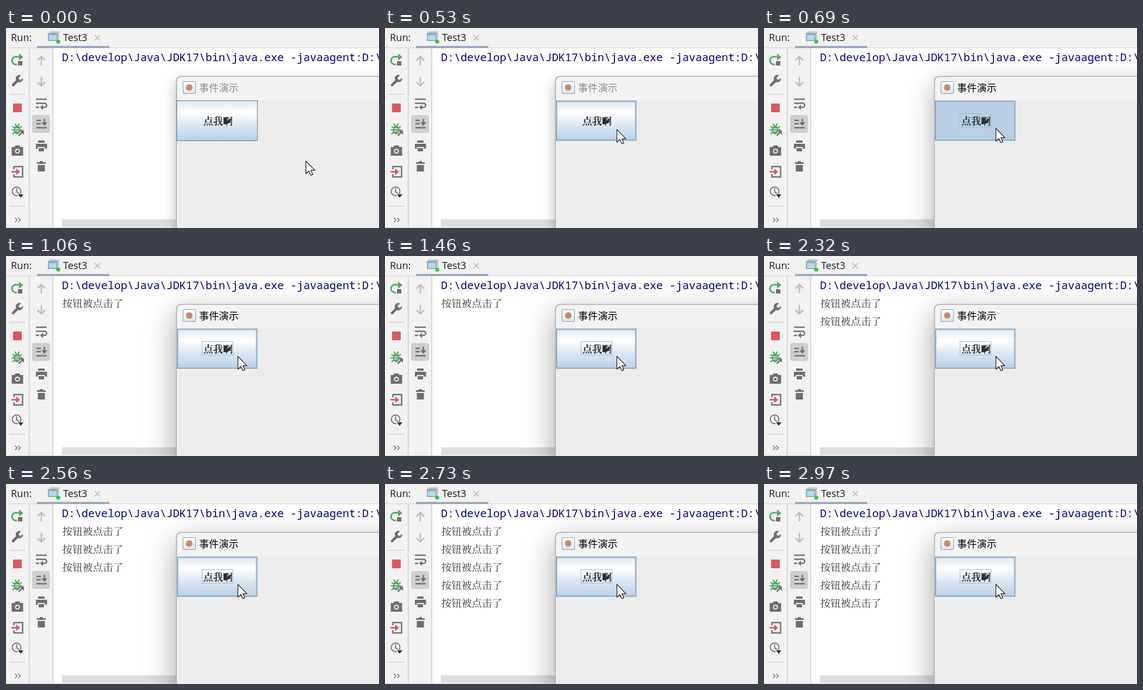
An HTML page for the animation above (3010 ms loop, 686 by 368 pixels).

```html
<!DOCTYPE html>
<html lang="zh">
<head>
<meta charset="utf-8">
<title>Run</title>
<style>
  html, body { margin: 0; width: 100%; height: 100%; overflow: hidden; background: #fff; }
  #stage { position: relative; width: 100%; height: 100%; overflow: hidden; contain: paint; }
  svg { display: block; width: 686px; height: 368px; position: absolute; left: 0; top: 0; }
  .ui { font: 18.2px "Open Sans", "Noto Sans", sans-serif; fill: #1a1a1a; }
  .code { font: 20px "Noto Sans Mono", monospace; fill: #000080; white-space: pre; }
  .row { font: 300 18.7px "Noto Serif CJK SC", "Noto Sans CJK SC", "Noto Sans CJK", serif; fill: #333; visibility: hidden; }
  .title { font: 18.2px "Noto Sans CJK SC", "Noto Sans CJK", sans-serif; }
  .label { font: bold 18px "Noto Serif CJK SC", "Noto Sans CJK SC", "Noto Sans CJK", serif; fill: #333; }
  #shadow, #shadowOn {
    position: absolute; left: 313px; top: 88px; right: 0; bottom: 0;
    border-radius: 10px 0 0 0;
  }
  /* the window runs on past the stage, so its shadow does too */
  #shadow::before, #shadowOn::before {
    content: ""; position: absolute; left: 0; top: 0; width: 480px; height: 420px;
    border-radius: inherit;
  }
  #shadow::before { box-shadow: 0 9px 26px rgba(0, 0, 0, .27); }
  #shadowOn::before { box-shadow: 0 18px 56px rgba(0, 0, 0, .36); }
  #shadowOn { opacity: 0; }
  .line { fill: none; stroke: #6e6e6e; stroke-width: 2.4; }
  .thin { fill: none; stroke: #6e6e6e; stroke-width: 1.8; }
  .gray { fill: #6e6e6e; }
  .pale { fill: none; stroke: #bdbdbd; stroke-width: 2.6; }
  .ring { fill: none; stroke: #b8cfe5; stroke-width: 1.25; }
  .dark { stroke: #7a8a99; }
</style>
</head>
<body>
<div id="stage">
<svg viewBox="0 0 686 368">
  <rect width="686" height="368" fill="#fff"/>
  <text class="code" x="103" y="61">D:\develop\Java\JDK17\bin\java.exe -javaagent:D:\</text>
  <g id="rows"></g>
  <rect x="103" y="352" width="583" height="14" fill="#dedede"/>
  <rect y="367" width="686" height="1" fill="#d1d1d1"/>
</svg>

<div id="shadow"></div>
<div id="shadowOn"></div>

<svg viewBox="0 0 686 368">
  <defs>
    <linearGradient id="ocean" x2="0" y2="1">
      <stop offset="0" stop-color="#dde8f3"/>
      <stop offset=".3" stop-color="#fff"/>
      <stop offset=".6" stop-color="#dde8f3"/>
      <stop offset="1" stop-color="#b8cfe5"/>
    </linearGradient>
    <linearGradient id="tile" x2="0" y2="1">
      <stop offset="0" stop-color="#fff"/>
      <stop offset="1" stop-color="#dfe5ec"/>
    </linearGradient>
  </defs>

  <!-- header -->
  <rect width="686" height="37" fill="#f2f2f2"/>
  <rect y="36" width="686" height="1" fill="#d1d1d1"/>
  <text class="ui" x="9" y="24">Run:</text>
  <rect x="57" y="33" width="133" height="4" fill="#9ca9ba"/>
  <path d="M80 6H98V20H80Z" fill="#c3cad0"/>
  <path d="M77 9H95V24H77Z" fill="#9aa7b0"/>
  <path d="M79 13H93V22H79Z" fill="#a9dcf2"/>
  <circle cx="96" cy="25" r="3.8" fill="#32c748"/>
  <text class="ui" x="105" y="24">Test3</text>
  <path d="M163 13L173 23M173 13L163 23" stroke="#b8b8b8" stroke-width="1.5"/>

  <!-- tool columns -->
  <rect y="37" width="86" height="330" fill="#f2f2f2"/>
  <path d="M42.7 37V368M86 37V368" stroke="#cfcfcf" stroke-width="1.6"/>
  <path d="M6 122H36M6 328H36" stroke="#cecece" stroke-width="1.6"/>

  <!-- rerun -->
  <path d="M20 67A7.200 7.200 0 1 1 20 53H25" fill="none" stroke="#59a869" stroke-width="3"/>
  <path d="M24 47L32 53.5L24 60Z" fill="#59a869"/>
  <rect class="gray" x="22" y="61" width="8" height="8"/>
  <!-- wrench -->
  <path d="M13 105L22.5 95.5" stroke="#6e6e6e" stroke-width="4.6" stroke-linecap="round"/>
  <path class="gray" d="M27.5 87A6.8 6.8 0 1 0 31.3 92L26.5 96L22.5 92.5Z"/>
  <!-- stop -->
  <rect x="13" y="139" width="16" height="16" fill="#db5860"/>
  <!-- bug -->
  <g fill="#59a869" stroke="#59a869">
    <ellipse cx="20.5" cy="187.5" rx="6" ry="8" stroke="none"/>
    <path d="M12 181L16 184M10.5 187.5H16M12 195L16 191.5M29 181L25 184M25 187.5H30.5M16.500 176L19 180M24.500 176L22 180" fill="none" stroke-width="2.4"/>
  </g>
  <path d="M17 185.5H24M17 189.5H23" stroke="#f2f2f2" stroke-width="1.4"/>
  <path d="M23 199L31 191" stroke="#f2f2f2" stroke-width="6"/>
  <path d="M23.5 198L30 191.5" stroke="#6e6e6e" stroke-width="2.6"/>
  <path class="gray" d="M25 188.5H33V196.5Z"/>
  <!-- camera -->
  <path class="gray" d="M10.5 219H15.5L17.5 216H24.5L26.5 219H31.5V235H10.5Z"/>
  <circle cx="21" cy="226.5" r="4.6" fill="#f2f2f2"/>
  <circle class="gray" cx="21" cy="226.5" r="2.6"/>
  <!-- exit -->
  <path class="line" d="M14.5 260V255H30.5V274H14.5V269"/>
  <path d="M10 264.5H20" stroke="#db5860" stroke-width="2.8"/>
  <path d="M18.5 258.5L26 264.5L18.5 270.5Z" fill="#db5860"/>
  <!-- clock -->
  <circle class="thin" cx="19.5" cy="300.5" r="8"/>
  <path class="thin" d="M19.5 295V301L24 305"/>
  <path d="M21 306H33L27 313.5Z" fill="#f2f2f2" stroke="#f2f2f2" stroke-width="2"/>
  <path d="M22 306H32L27 312.5Z" fill="#333"/>
  <!-- more -->
  <path d="M16.5 349L20.5 353L16.5 357M22.5 349L26.5 353L22.5 357" fill="none" stroke="#6e6e6e" stroke-width="1.4"/>

  <!-- second column -->
  <path class="pale" d="M65 69V53M58 59.5L65 52.5L72 59.5"/>
  <path class="pale" d="M65 90V106M58 99.5L65 106.5L72 99.5"/>
  <path class="line" d="M55 131H75M55 138.5H71A3.6 3.6 0 0 1 71 146H66M55 146H61"/>
  <path class="gray" d="M68 141V151L62.5 146Z"/>
  <rect x="48" y="160" width="33" height="33" rx="4" fill="#cfcfcf"/>
  <path class="line" d="M56 170H64M56 176H64M56 183.5H75M70.5 167V176"/>
  <path class="gray" d="M65 173.500H76L70.5 180Z"/>
  <path class="gray" d="M59 207H71V211H59ZM55 213H75.5V222H71.5V219H58.5V222H55Z"/>
  <path class="gray" d="M60 221H70V227H60Z"/>
  <path class="gray" d="M57 247H62V245H68V247H73V250H57ZM58.5 252H71.5V264H58.5Z"/>

  <!-- window -->
  <path d="M313.5 369V99Q313.5 89 323.5 89H690V369Z" fill="#f3f3f3" stroke="#a8a8a8" stroke-width="1.6"/>
  <rect x="314" y="133" width="372" height="235" fill="#ececec"/>
  <rect x="325.5" y="98.5" width="23" height="22" rx="1.5" fill="url(#tile)" stroke="#8496aa"/>
  <circle cx="337" cy="109.5" r="6" fill="#c98a6c"/>
  <text class="title" id="title" x="355" y="117">事件演示</text>

  <!-- button -->
  <rect id="face" x="314" y="133" width="149" height="75"/>
  <rect id="plain" class="ring dark" x="314.1" y="133.6" width="148.3" height="73.8"/>
  <g id="hover">
    <rect class="ring" x="314.1" y="133.6" width="148.3" height="73.8"/>
    <rect class="ring dark" x="315.3" y="134.9" width="145.8" height="71.2"/>
    <rect class="ring" x="316.6" y="136.1" width="143.3" height="68.8"/>
  </g>
  <text class="label" x="363" y="178">点我啊</text>
  <path d="M400.5 165.5H408L406 171L415 166L411 174L406 177H400.5Z" fill="#2e2e2e"/>
  <rect id="focus" x="360.5" y="157.5" width="57" height="25" fill="none" stroke="#a3b8cc"/>

  <path id="cursor" d="M.5 .7V24.3L6 19.3L9.7 27L13.2 25.4L9.7 17.8H17Z" fill="#fff" stroke="#111" stroke-width="1.2" stroke-linejoin="round"/>
</svg>
</div>

<script>
const LOOP = 3010;
const MOVE = { start: 40, end: 530, steps: 13, from: [551, 244], to: [426, 186] };
const REST = [426, 184];
const ACTIVE = 610;
const PRESSES = [[610, 730], [1300, 1460], [2160, 2240], [2440, 2520], [2600, 2680]];
const PRINTS = [940, 1750, 2480, 2640, 2730];

const $ = id => document.getElementById(id);
const show = (el, on) => { el.style.visibility = on ? "visible" : "hidden"; };
const clamp = v => Math.max(0, Math.min(1, v));

const rows = PRINTS.map((_, i) => {
  const el = document.createElementNS("http://www.w3.org/2000/svg", "text");
  el.setAttribute("class", "row");
  el.setAttribute("x", 103.5);
  el.setAttribute("y", 94 + i * 33);
  el.textContent = "按钮被点击了";
  return $("rows").appendChild(el);
});

function cursorAt(t) {
  const { start, end, steps, from, to } = MOVE;
  if (t < start) return from;
  if (t >= ACTIVE) return REST;
  const gap = (end - start) / (steps - 1);
  const p = clamp((Math.floor((t - start) / gap + 1e-6) + 1) / steps);
  const k = p * p * (3 - 2 * p);
  return from.map((a, i) => Math.round(a + (to[i] - a) * k));
}

function draw(t) {
  const [x, y] = cursorAt(t);
  const over = x < 463 && y < 208;
  const pressed = PRESSES.some(([down, up]) => t >= down && t < up);
  const active = t >= ACTIVE;

  $("cursor").setAttribute("transform", `translate(${x} ${y})`);
  $("face").setAttribute("fill", pressed ? "#b8cfe5" : "url(#ocean)");
  show($("hover"), over);
  show($("plain"), !over);
  show($("focus"), active);
  $("title").setAttribute("fill", active ? "#000" : "#8c8c8c");

  // the window shadow deepens in four steps
  const depth = active ? clamp((Math.floor((t - ACTIVE) / 40) + 1) / 4) : 0;
  $("shadowOn").style.opacity = depth;
  $("shadow").style.opacity = 1 - depth;

  rows.forEach((el, i) => show(el, t >= PRINTS[i]));
}

const began = performance.now();
function tick() {
  draw((performance.now() - began) % LOOP);
  requestAnimationFrame(tick);
}
tick();
</script>
</body>
</html>
```
